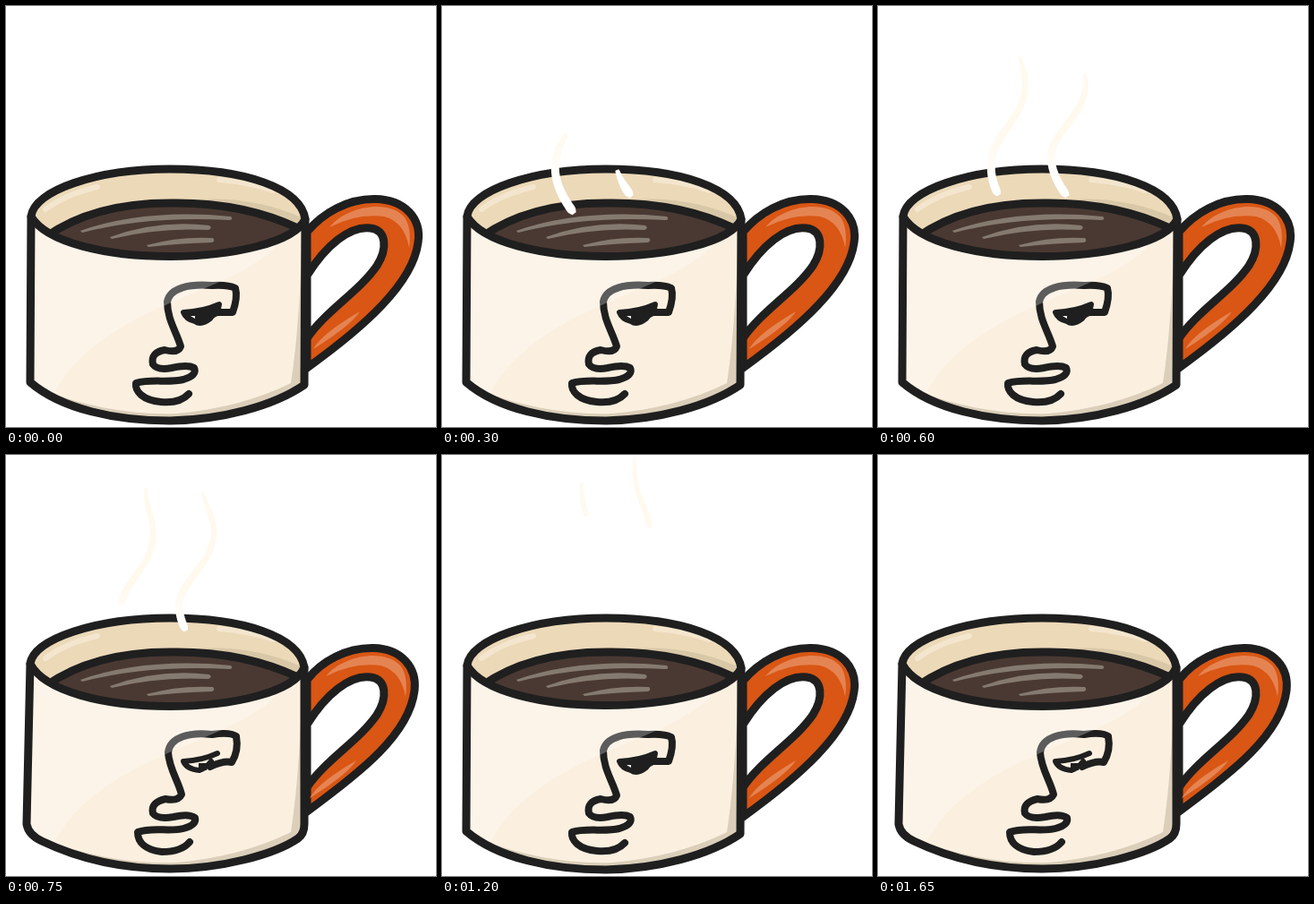
An HTML page for the animation above (1.8 s loop, 480 by 470 pixels).

```html
<!DOCTYPE html>
<html lang="en">
<head>
<meta charset="utf-8">
<title>Steaming cup</title>
<style>
html, body { margin: 0; width: 100%; height: 100%; overflow: hidden; background: #fff; }
svg { display: block; width: 480px; height: 470px; }
.ink { stroke: #1f1f1f; stroke-width: 9; stroke-linecap: round; stroke-linejoin: round; }
.thin { stroke-width: 8; }
.fine { stroke-width: 6; }
.line { fill: none; stroke-linecap: round; stroke-linejoin: round; }
</style>
</head>
<body>
<svg viewBox="0 0 480 470">
  <defs>
    <linearGradient id="mist" gradientUnits="userSpaceOnUse" x1="0" y1="195" x2="0" y2="150">
      <stop stop-color="#fff"/><stop offset="1" stop-color="#fff9ee"/>
    </linearGradient>
    <path id="body"/>
    <path id="rim"/>
    <clipPath id="inBody"><use href="#body"/></clipPath>
    <clipPath id="inRim"><use href="#rim"/></clipPath>
  </defs>

  <path id="handle" class="ink" fill="#d95614"/>
  <g id="shine" fill="#e58453">
    <path d="M361 247C380 223 428 215 445 236Q453 248 450 270Q445 241 422 235Q392 231 361 247Z"/>
    <path d="M343 383Q352 366 395 341Q386 356 343 383Z"/>
  </g>
  <path class="ink" fill="#fff" d="M336 301C357 267 384 245 407 248C425 250 426 271 414 290C394 319 357 340 336 371Z"/>

  <use href="#body" fill="#fbf0e0"/>
  <g clip-path="url(#inBody)">
    <path fill="#dbcfba" d="M331 258C328 320 326 370 318 421C280 440 235 451 190 455C140 457 90 447 44 430L60 470H345V258Z"/>
  </g>
  <path id="face" class="ink thin line"/>
  <path id="eye" class="ink fine"/>
  <path id="glint"/>
  <path clip-path="url(#inBody)" fill="#fff" opacity=".27" d="M20 225V432H54C78 385 130 355 178 334C222 314 268 300 300 270V225Z"/>
  <use href="#body" class="ink line"/>

  <use href="#rim" fill="#ecd9b8"/>
  <g clip-path="url(#inRim)">
    <path fill="#d9c8a7" d="M215 216Q275 212 330 236V260Q270 225 215 221Z"/>
    <g class="line" stroke="#f4e6ce" stroke-width="6">
      <path d="M44 227Q67 210 102 202"/>
      <path d="M238 194Q274 197 298 206"/>
    </g>
    <path class="ink" fill="#4a3932" d="M44 258C82 231 130 220 183 220C240 219 288 230 326 248L320 290H50Z"/>
    <g fill="#857a70">
      <path d="M83 251Q155 226 251 235Q254 238 250 239Q158 234 85 253Z"/>
      <path d="M116 258Q170 238 227 245Q231 248 226 250Q170 247 118 260Z"/>
      <path d="M157 267Q193 257 231 259Q234 262 230 264Q192 265 159 269Z"/>
    </g>
  </g>
  <use href="#rim" class="ink line"/>

  <g id="steam" fill="url(#mist)" stroke="url(#mist)" stroke-width="2" stroke-linejoin="round"></g>
</svg>
<script>
const STEP = 150, STEPS = 12;
const $ = id => document.getElementById(id);

function svgPath(d = '') {
  const path = document.createElementNS('http://www.w3.org/2000/svg', 'path');
  path.setAttribute('d', d);
  return path;
}

// Two hand-drawn versions of the cup alternate on every step.
const poses = [{
  rim: 'M28 235C31 206 101 182 183 182C266 182 329 203 334 238C322 264 252 279.500 183 279.500C112 279.500 45 264 28 235Z',
  body: 'M28 235L27 420C62 450 122 463 183 463C240 462 298 447 333 423L334 238',
  handle: 'M336 252C354 231 381 215 412 215.500C446 216 464 238 460 264C454 310 400 358 336 404Z',
  face: 'M236 342H253Q259 325 256 315Q248 311 230 312C204 310 183 315 180 330C180 350 190 363 195 380Q192 388 177 384Q161 387 164 400Q169 407 185 404Q203 400 210 404Q214 412 198 417C182 421 161 416 145 421C144 430 152 440 173 442Q194 444 204 433',
  eye: 'M198 342Q220 341 238 333L236 343Q230 345 228 349Q218 357 211 352Q201 350 198 342Z',
  eyeFill: '#1f1f1f',
  glint: 'M206 346H211V349Z',
  glintFill: '#fff',
  shine: 0
}, {
  rim: 'M27 233C31 205 101 182 183 182C264 182 327 202 333 237C322 265 252 280.500 183 280.500C110 280.500 43 264 27 233Z',
  body: 'M27 233Q25 320 23 412Q25 424 40 431C90 455 140 462 183 462C240 462 300 446 326 428Q333 423 333 412V237',
  handle: 'M336 251C352 230 380 215 410 215.500C442 216 459 238 456 263C450 312 396 354 336 398Z',
  face: 'M228 348Q243 341 252 343Q260 330 257 314Q250 309 230 312C205 309 183 315 181 332C182 350 192 363 196 379Q192 387 178 384Q161 388 164 400Q169 407 187 404Q204 400 211 405Q213 413 198 417C182 421 163 415 147 421C147 432 155 441 174 443Q196 443 205 432',
  eye: 'M236 333Q219 341 198 342Q202 351 216 352Q224 349 229 342',
  eyeFill: '#fbf0e0',
  glint: 'M215 344H224V352H215Z',
  glintFill: '#1f1f1f',
  shine: -4
}];

// Each plume follows a curve; its head and tail run up it as [first step, duration].
const plumes = [
  { d: 'M147 231C128 205 118 180 135 150C146 130 165 115 164 86C164 66 154 55 156 32', head: [.9, 5.5], tail: [3.5, 6.5] },
  { d: 'M211 212C194 190 187 165 200 148C212 128 232 112 232 85C231 60 212 45 215 3', head: [1.6, 7], tail: [4.6, 6.8] }
].map(plume => ({ ...plume, curve: svgPath(plume.d), ribbon: $('steam').appendChild(svgPath()) }));

function easeOut([begin, duration], step, power) {
  const u = Math.min(1, Math.max(0, (step - begin) / duration));
  return 1 - (1 - u) ** power;
}

function ribbonPath({ curve, head, tail }, step) {
  const total = curve.getTotalLength();
  const from = total * easeOut(tail, step, 1.5), to = total * easeOut(head, step, 2.6);
  if (to - from < 5) return '';
  const left = [], right = [], samples = 50;
  for (let i = 0; i <= samples; i++) {
    const at = from + (to - from) * i / samples;
    const { x, y } = curve.getPointAtLength(at);
    const a = curve.getPointAtLength(at - 1), b = curve.getPointAtLength(at + 1);
    const angle = Math.atan2(b.y - a.y, b.x - a.x);
    const taper = Math.min(1, .4 + (to - at) / 35, .5 + (at - from) / 8);
    const half = (1.2 + y / 80) * taper;
    const dx = half * Math.sin(angle), dy = -half * Math.cos(angle);
    left.push([x + dx, y + dy]);
    right.unshift([x - dx, y - dy]);
  }
  return 'M' + left.concat(right).join('L') + 'Z';
}

function draw(step) {
  const pose = poses[step % 2];
  for (const part of ['rim', 'body', 'handle', 'face', 'eye', 'glint']) $(part).setAttribute('d', pose[part]);
  $('eye').setAttribute('fill', pose.eyeFill);
  $('glint').setAttribute('fill', pose.glintFill);
  $('shine').setAttribute('transform', `translate(${pose.shine} 0)`);
  for (const plume of plumes) plume.ribbon.setAttribute('d', ribbonPath(plume, step));
}

const start = performance.now();
let shown = -1;
function tick() {
  const step = Math.floor((performance.now() - start) / STEP) % STEPS;
  if (step !== shown) draw(shown = step);
  requestAnimationFrame(tick);
}
tick();
</script>
</body>
</html>
```
